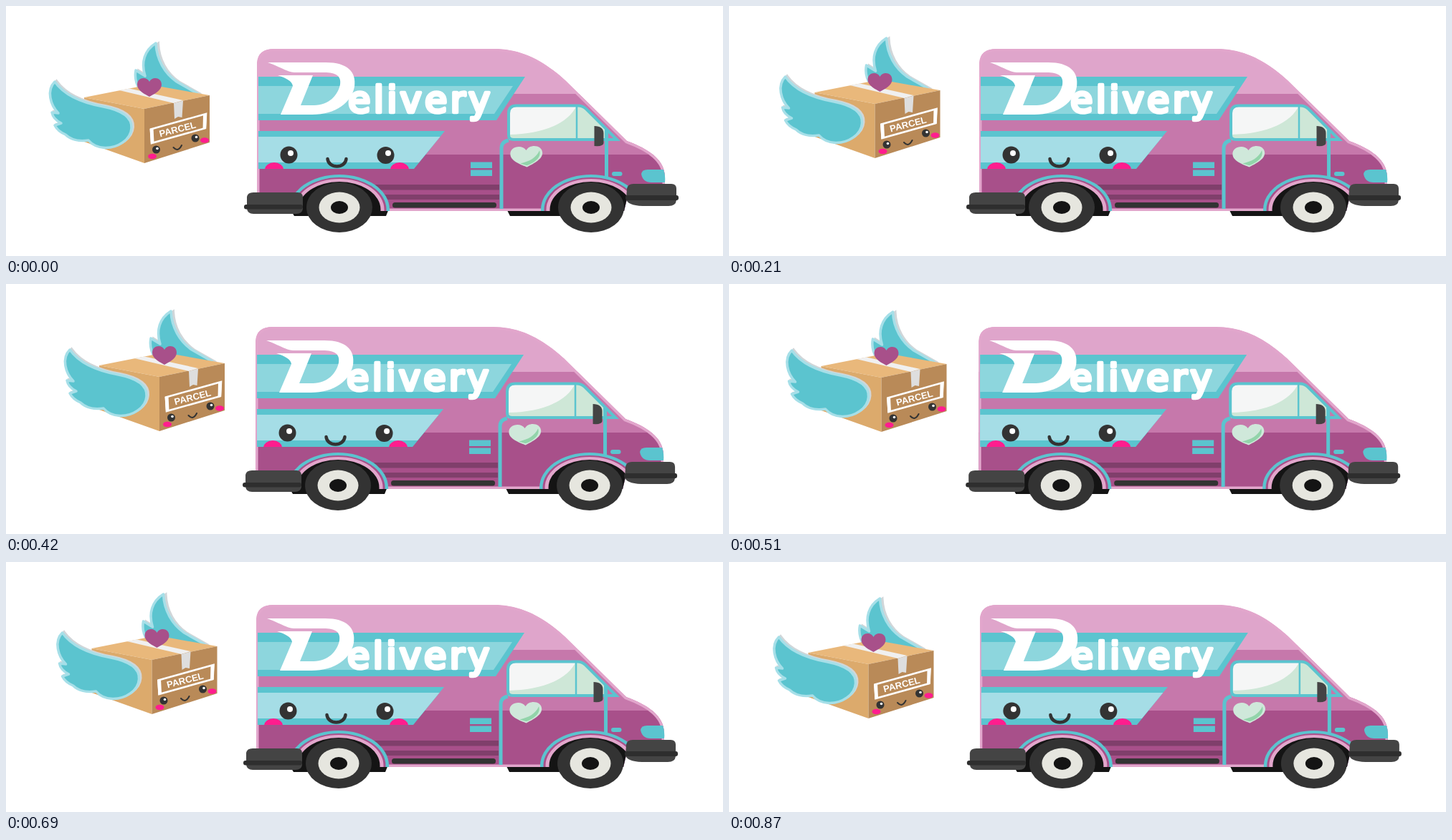
Animation, 1000 px wide and 350 px high, one loop 900 ms. Source, as an HTML page:

```html
<!DOCTYPE html>
<html lang="en">
<head>
<meta charset="utf-8">
<title>Delivery</title>
<style>
  html, body { margin: 0; width: 100%; height: 100%; overflow: hidden; background: #fff; }
  svg { display: block; width: 100%; height: 100%; }
  .teal { fill: #5bc4cf; }
  .dark { fill: #333; }
  .blush { fill: #ff1d8e; }
  .frame { fill: none; stroke: #5bc4cf; stroke-width: 5; }
  .smile { fill: none; stroke: #333; stroke-linecap: round; }
  .white { fill: #fff; }
  .shade { fill: #d0d6d9; stroke: #d0d6d9; stroke-width: 3; }
  .rim { stroke: #a6dfe8; stroke-width: 3.5; stroke-linejoin: round; }
</style>
</head>
<body>
<svg viewBox="0 0 1000 350" preserveAspectRatio="none">
  <defs>
    <path id="shell" d="M350 80 Q351 60 374 60 H680 C718 60 748 75 780 104 L866 189 C896 200 919 215 919 240 V256 L866 270 L862 287 H350 Z"/>
    <clipPath id="body"><use href="#shell"/></clipPath>
    <clipPath id="band"><path d="M352 175 H612 L569 228 H352 Z"/></clipPath>
    <path id="heart" d="M0 13 C-5 10 -17 5 -17 -4 C-17 -14 -4 -16 0 -8 C4 -16 17 -14 17 -4 C17 5 5 10 0 13 Z"/>
    <clipPath id="glass"><path d="M702 188 V150 Q702 139 713 139 H798 Q804 139 809 144 L837 172 V188 Z"/></clipPath>
    <g id="arch">
      <ellipse class="teal" rx="70" ry="49"/>
      <ellipse fill="#a8508a" rx="65.5" ry="45"/>
      <ellipse fill="#e2a6cc" rx="62.5" ry="43"/>
      <ellipse fill="#141414" rx="57.5" ry="39"/>
    </g>
    <g id="wheel">
      <ellipse class="dark" rx="46" ry="35"/>
      <ellipse fill="#e6e6df" rx="28.5" ry="21.5"/>
      <ellipse fill="#141414" rx="12" ry="9"/>
    </g>
    <path id="nearWing" d="M68 106 C82 126 108 136 136 141 C161 146 176 156 175 171 C174 187 156 199 138 198.500 C128 198 120 194 115 188 C102 190 90 187 83 180 C76 177 71 173 68 167 L77 164 C69 160 65 155 64 149 L73 150 C62 139 56 118 68 106 Z"/>
    <path id="farWing" d="M209 52 C210 75 221 94 238 106 L266 122 L230 132 L187 118 C182 110 179 100 181 90 L194 98 C188 79 193 62 209 52 Z"/>
  </defs>

  <g id="van">
    <path fill="#141414" d="M396 284 H534 L530 294 H402 Z M698 284 H780 V294 H703 Z"/>
    <g clip-path="url(#body)">
      <use href="#shell" fill="#dfa5cb"/>
      <rect x="340" y="123" width="600" height="86" fill="#c678ab"/>
      <rect x="340" y="208" width="600" height="90" fill="#a8508a"/>
      <path fill="#803f6b" d="M510 250 H688 V257.500 H517 Z M522 264 H688 V271 H527 Z"/>
      <use href="#shell" fill="none" stroke="#e2a6cc" stroke-width="7"/>
      <use href="#arch" x="465" y="285"/>
      <use href="#arch" x="816" y="285"/>
    </g>
    <rect class="dark" x="539" y="275" width="145" height="7.500" rx="3.500"/>

    <path class="teal" d="M352 99 H724 L684 160 H352 Z"/>
    <path fill="#8dd6dd" d="M352 112 H707 L681 151 H352 Z"/>
    <g class="white">
      <path d="M365 79 H446 C476 79 489 92 486 113 C482 135 460 152 427 152 H383 L400 112 C399 105 391 101 379 97 H428 L411 139 H430 C450 139 463 125 466 110 C468 98 460 93 444 93 H402 C392 92 384 86 365 79 Z"/>
      <text x="477" y="148.500" font-family="'DejaVu Sans', sans-serif" font-size="51" letter-spacing="4.300" stroke="#fff" stroke-width="4.500" stroke-linejoin="round">elivery</text>
    </g>

    <path class="teal" d="M352 175 H612 L569 228 H352 Z"/>
    <path fill="#a5dde6" d="M352 183 H605.500 L576 219 H352 Z"/>
    <g clip-path="url(#band)" class="blush">
      <ellipse cx="374" cy="229" rx="13" ry="10"/>
      <ellipse cx="549" cy="229" rx="13" ry="10"/>
    </g>
    <circle class="dark" cx="394.500" cy="208.500" r="12"/>
    <circle class="dark" cx="529.500" cy="209" r="12"/>
    <circle class="white" cx="397" cy="206" r="4"/>
    <circle class="white" cx="533" cy="206" r="4"/>
    <path class="smile" stroke-width="4.500" d="M448.500 214 C450 228 473 228 474.500 214"/>

    <g clip-path="url(#glass)">
      <rect x="700" y="137" width="140" height="54" fill="#f5f6f6"/>
      <path fill="#cee7d7" d="M700 180 C745 180 784 166 796 139 V137 H840 V191 H700 Z"/>
    </g>
    <path class="frame" style="stroke-width:2.500" d="M796 139 V187"/>
    <path class="frame" style="stroke-width:4" d="M701 181 V150 Q701 139.500 712 139.500 H798 Q804 139.500 809 144 L852 187 H708 Q701 187 701 181 Z"/>
    <path class="frame" d="M691 284 V199 Q691 190 701 188 M837.500 173 V241"/>
    <path fill="#444" d="M820.500 168 C829 168 833.500 172 833.500 178 V192 Q833 197 820.500 196 Z"/>
    <g transform="translate(726 211) rotate(-3) scale(1.32 1.12)">
      <use href="#heart" fill="#cfe8da"/>
      <path fill="#92d4aa" d="M-7 8 C3 6 10 2 14 -7 C16 2 8 8 0 11 Z"/>
    </g>
    <g class="teal">
      <rect x="648" y="218.500" width="30" height="8.500"/>
      <rect x="648" y="229.500" width="30" height="8.500"/>
      <rect x="845" y="232" width="14.500" height="6" rx="3"/>
      <path d="M886 235 Q887 229 895 229 H917 Q920 238 919 247 H900 Q888 247 886 235 Z"/>
    </g>

    <use href="#wheel" x="465" y="282"/>
    <use href="#wheel" x="816" y="282"/>
    <g fill="#444">
      <path d="M336 267 Q337 261 345 261 H407 Q414 261 414 268 V284 Q413 291 405 291 H345 Q337 291 336 284 Z"/>
      <path d="M866 256 Q867 249 875 249 H928 Q935 249 935 256 V272 Q934 280 924 280 H888 Q866 279 865 270 Z"/>
    </g>
    <g fill="#2e2e2e">
      <rect x="332" y="278" width="82" height="6.500" rx="3"/>
      <rect x="864" y="265" width="74" height="7" rx="3"/>
    </g>
  </g>

  <g id="parcel">
    <use href="#farWing" class="shade" x="3.500"/>
    <use href="#farWing" class="teal rim"/>
    <path fill="#e9b87b" d="M109 128 L200 110 L284 125 L193 144 Z"/>
    <path fill="#dcaa6c" d="M109 128 L193 144 V220 L109 190 Z"/>
    <path fill="#b98a58" d="M193 144 L284 125 V191 L193 220 Z"/>
    <path fill="#f0f0f0" d="M158 118 L172 115.500 L247 132 L234 136 Z"/>
    <path fill="#dedede" d="M234 136 L247 132.500 L245.500 156 L240 155 L235 158 Z"/>
    <path fill="none" stroke="#fff" stroke-width="2.500" d="M202 172.500 L279 151 L278 171 L203 192 Z"/>
    <path class="white" d="M200.500 172 L205.500 171 L206.500 191 L202 193 Z M275 152 L280 150 L279 171.500 L274.500 173 Z"/>
    <text class="white" transform="translate(215 183.500) rotate(-14.500)" font-family="'Liberation Sans', sans-serif" font-weight="700" font-size="13">PARCEL</text>
    <g class="blush">
      <ellipse cx="204" cy="210.500" rx="6" ry="3.800"/>
      <ellipse cx="277" cy="188" rx="6" ry="3.800"/>
    </g>
    <circle class="dark" cx="209.500" cy="201" r="5.500"/>
    <circle class="dark" cx="264" cy="185" r="5.500"/>
    <circle class="white" cx="211" cy="199.500" r="1.800"/>
    <circle class="white" cx="265.500" cy="183.500" r="1.800"/>
    <path class="smile" stroke-width="2" d="M233.500 198 Q240 205 245 195"/>
    <use href="#heart" fill="#a8508a" x="200" y="114"/>
    <use href="#nearWing" class="shade" x="2.500" y="-1.500"/>
    <use href="#nearWing" class="teal rim"/>
  </g>
</svg>
<script>
  const LOOP = 900, STEP = 30, HALF = 15;
  const van = document.getElementById('van');
  const parcel = document.getElementById('parcel');
  const start = performance.now();

  const shift = (el, x, y) => el.setAttribute('transform', `translate(${x} ${y})`);

  // Both parts drift out and back at a constant pace, in 30 ms ticks.
  function draw(time) {
    const tick = Math.floor((time % LOOP) / STEP);
    const away = Math.min(tick, 2 * HALF - tick);
    shift(parcel, away * 1.5, -away);
    shift(van, -away * 0.14, 0);
  }

  function loop(now) {
    draw(Math.max(0, now - start));
    requestAnimationFrame(loop);
  }
  draw(0);
  requestAnimationFrame(loop);
</script>
</body>
</html>
```
